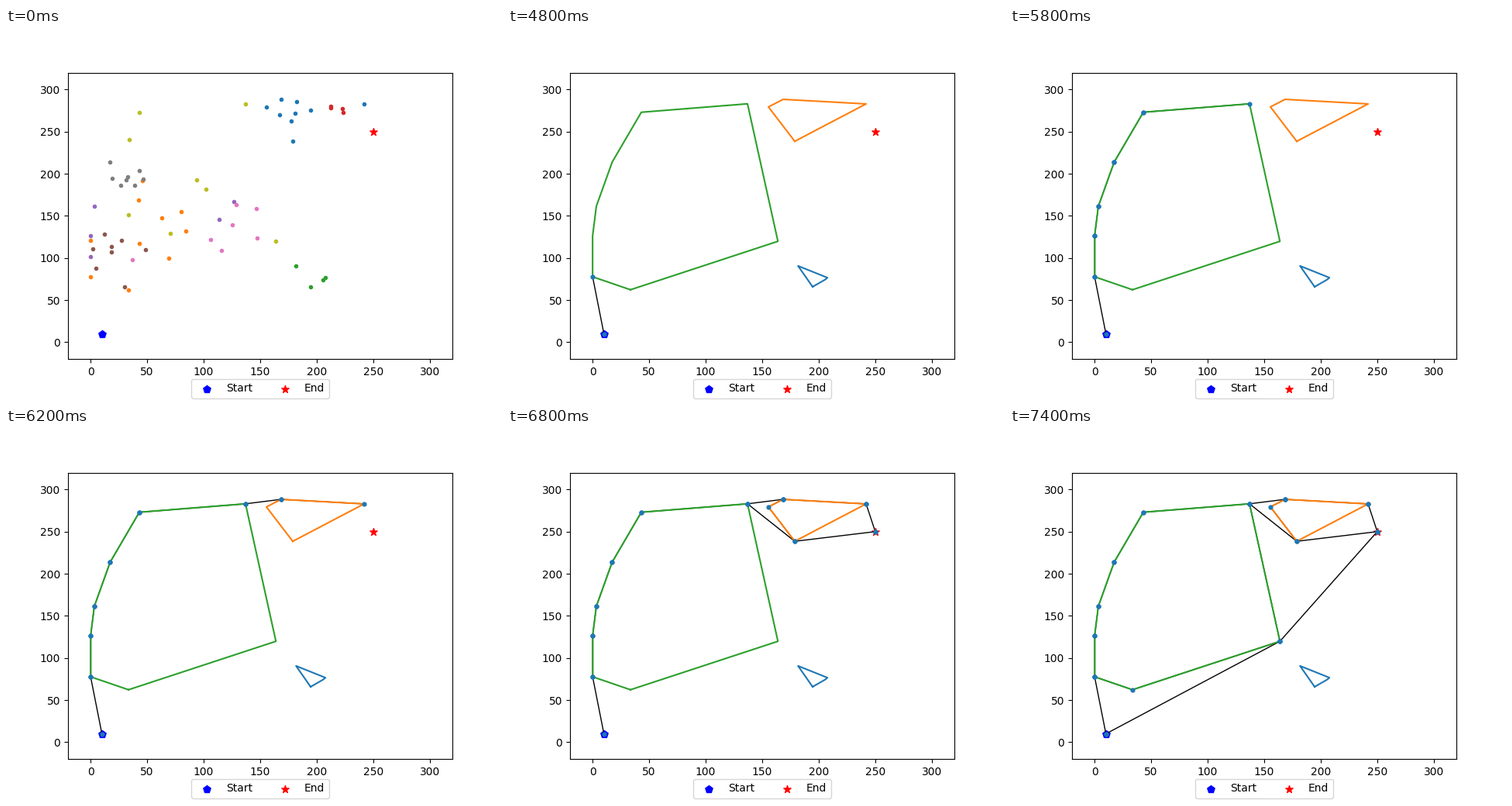
A matplotlib script for the animation above (7.6 s loop, 640 by 480 pixels).

```python
import matplotlib.pyplot as plt
import numpy as np
from matplotlib.animation import FuncAnimation

START, END = (10, 10), (250, 250)
HOLD, FRAMES = 12, 38
rng = np.random.default_rng(4)


def cloud(corners, inner=0):
    """Corner points plus random points inside them."""
    mix = rng.dirichlet(np.ones(len(corners)), inner)
    return list(corners) + [tuple(p) for p in mix @ np.array(corners)]


def arc(cx, cy, rx, ry, a, b, n):
    t = np.radians(np.linspace(a, b, n))
    return list(zip(cx + rx * np.cos(t), cy + ry * np.sin(t)))


# Obstacles in colour-cycle order
CLOUDS = [
    cloud([(178.8, 238.5), (241.9, 282.9), (168.5, 288.3), (155.5, 279.3)], 5),
    cloud([(33.5, 62.3), (69, 99.8), (84.2, 132), (80, 155), (45.6, 192.2),
           (0, 121), (0, 77.7)], 3),
    cloud([(194.6, 65.8), (205.5, 74.2), (207.7, 76.6), (181.7, 90.6)]),
    cloud([(212.4, 278.2), (223.4, 272.7), (222.7, 277), (212.4, 280)]),
    cloud([(0, 101.6), (113.7, 145.8), (126.7, 167), (3.3, 161.4), (0, 126.3)]),
    cloud([(30, 65.8), (48.5, 110), (27.3, 121.2), (12.2, 128.3), (1.9, 110.8),
           (4.7, 87.8)], 2),
    cloud([(37, 98), (116, 109), (147.3, 123.5), (146.6, 158.6), (128.8, 163.2)], 2),
    cloud([(17.3, 213.8)] + arc(33, 196, 14, 11, -171, 42, 5), 2),
    cloud([(163.9, 119.8), (137, 283), (43.1, 273), (34.4, 240.5), (33.7, 151.3),
           (70.5, 129.3)], 2),
]


def hull(points):
    """Counter-clockwise convex hull, starting at the lowest point."""
    pts = sorted(set(points), key=lambda p: (p[1], p[0]))

    def chain(seq):
        out = []
        for x, y in seq:
            while len(out) > 1:
                (x0, y0), (x1, y1) = out[-2:]
                if (x1 - x0) * (y - y0) - (y1 - y0) * (x - x0) > 0:
                    break
                out.pop()
            out.append((x, y))
        return out[:-1]

    return chain(pts) + chain(pts[::-1])


def merged(*ids):
    return hull([p for i in ids for p in CLOUDS[i]])


fig, ax = plt.subplots(figsize=(6.4, 4.8), dpi=100)
ax.set(xlim=(-20, 320), ylim=(-20, 320))
ax.scatter(*START, color="blue", marker="p", s=50, label="Start")
ax.scatter(*END, color="red", marker="*", s=50, label="End")
ax.legend(loc="upper center", bbox_to_anchor=(0.5, -0.05), ncol=2)


def outline(pts, fmt="-", **style):
    return ax.plot(*zip(*pts, pts[0]), fmt, **style)[0]


clouds = [ax.plot(*zip(*c), ".", color=f"C{i}")[0] for i, c in enumerate(CLOUDS)]
hulls = [outline(hull(c), ".-", color=f"C{i}", lw=1) for i, c in enumerate(CLOUDS)]

small, top, big = merged(2), merged(0, 3), merged(1, 4, 5, 6, 7, 8)
blocks = [outline(h, color=f"C{i}", lw=1.5, zorder=2.5)
          for i, h in enumerate((small, top, big))]

# Upper route edge by edge, then the alternatives found on the way back
route = [START, *big[:1:-1], top[2], top[1], END]
steps = list(enumerate(zip(route, route[1:])))
steps += [
    (10, (big[2], top[0], END)),
    (10, (top[2], top[3], top[0])),
    (12, (big[2], big[1], END)),
    (12, (big[1], big[0], big[-1])),
    (13, (START, big[1])),
]

trail = []
for k, pts in steps:
    xy = list(zip(*pts))
    trail.append((k, ax.plot(*xy, color="black", lw=1, zorder=2)[0]))
    trail.append((k, ax.scatter(*xy, color="C0", s=12, zorder=3)))


def update(i):
    step = i - 2 * HOLD
    for a in clouds:
        a.set_visible(i < HOLD)
    for a in hulls:
        a.set_visible(HOLD <= i < 2 * HOLD)
    for a in blocks:
        a.set_visible(step >= 0)
    for k, a in trail:
        a.set_visible(step >= k)
    return clouds + hulls + blocks + [a for _, a in trail]


anim = FuncAnimation(fig, update, frames=FRAMES, interval=200, repeat=True, repeat_delay=0)
plt.show()
```
